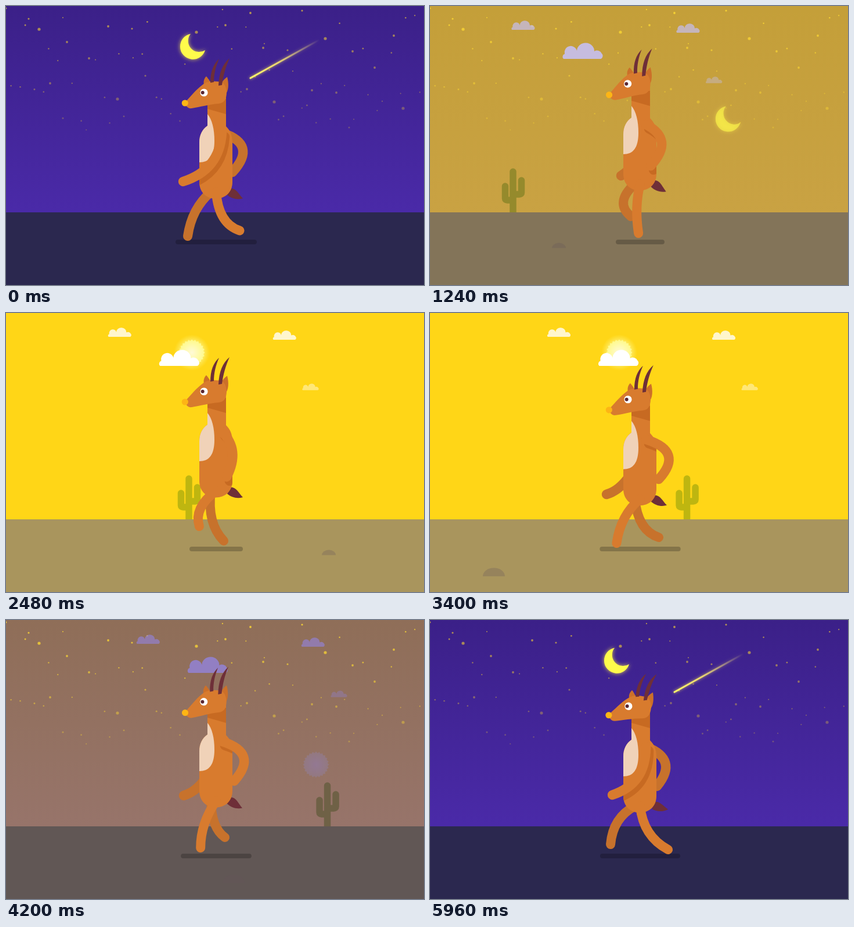
These frames come from a looping animation (720x480 px, 6040 ms). An HTML page with a canvas:

```html
<!DOCTYPE html>
<html lang="en">
<head>
<meta charset="utf-8">
<title>Night and day walk</title>
<style>
  html, body { margin: 0; width: 100%; height: 100%; overflow: hidden; background: #3b2088; }
  canvas { display: block; width: 720px; height: 480px; }
</style>
</head>
<body>
<canvas id="stage" width="720" height="480"></canvas>
<script>
const ctx = document.getElementById('stage').getContext('2d');
const LOOP = 6040, TICK = 40, STRIDE = LOOP / 8, STEP = STRIDE / 2;
const HORIZON = 355;
const SKIN = '#d87b2e', FAR_SKIN = '#c7722c', SHADE = '#c76a22', MAROON = '#6e2f38';

const clamp = v => Math.max(0, Math.min(1, v));
const lerp = (a, b, k) => a + (b - a) * k;
const mix = (a, b, k) => `rgb(${a.map((v, i) => Math.round(lerp(v, b[i], k)))})`;
const easeInOut = k => k < 0.5 ? 2 * k * k : 1 - 2 * (1 - k) ** 2;

// Smooth periodic interpolation through rows of [time, ...values].
function track(keys, period, time) {
  const t = ((time % period) + period) % period, n = keys.length;
  let i = n - 1;
  while (i > 0 && keys[i][0] > t) i--;
  const at = j => {
    const wrap = Math.floor(j / n), row = keys[j - wrap * n];
    return [row[0] + wrap * period, ...row.slice(1)];
  };
  const [a, b, c, d] = [at(i - 1), at(i), at(i + 1), at(i + 2)];
  const h = c[0] - b[0], u = (t - b[0]) / h, u2 = u * u, u3 = u2 * u;
  return b.slice(1).map((v, j) => {
    const k = j + 1;
    const m0 = (c[k] - a[k]) / (c[0] - a[0]) * h;
    const m1 = (d[k] - b[k]) / (d[0] - b[0]) * h;
    return (2 * u3 - 3 * u2 + 1) * v + (u3 - 2 * u2 + u) * m0 +
           (3 * u2 - 2 * u3) * c[k] + (u3 - u2) * m1;
  });
}

// Per step: body lift, head lift, head tilt in degrees, shadow half width.
const BOUNCE = [
  [0, 0, 0, 0, 70], [47, -9, -8.5, -1.5, 61], [107, -14, -15.5, -2, 42],
  [215, -14, -14, 0, 46], [297, 0, 0, 4.5, 69], [340, 0, 0, 3, 70]
];
// Per stride: foot, then bend of the leg.
const LEG = [
  [0, 313, 396, 320, 348], [47, 327, 392, 327, 350], [107, 351, 391, 344, 345],
  [215, 375, 392, 346, 362], [297, 402, 395, 359, 372], [380, 394, 386, 358, 374],
  [425, 377, 374, 354, 358], [485, 346, 362, 317, 338], [592, 325, 367, 315, 335],
  [675, 311, 386, 315, 340]
];
// Per stride: hand, then elbow.
const NEAR_ARM = [
  [0, 305, 302, 368, 282], [107, 337, 288, 370, 268], [215, 380, 282, 404, 236],
  [380, 394, 286, 438, 238], [425, 393, 277, 436, 229], [485, 380, 275, 422, 230],
  [592, 355, 288, 380, 262], [675, 314, 301, 372, 282]
];
const FAR_ARM = [
  [0, 390, 286, 434, 238], [107, 378, 274, 414, 230], [215, 356, 284, 376, 258],
  [380, 304, 312, 346, 300], [425, 306, 302, 348, 290], [485, 329, 292, 358, 276],
  [592, 378, 282, 404, 236], [675, 391, 286, 429, 240]
];

const shape = d => new Path2D(d);
const BODY = shape('M347 150V206C338 212 333 222 333 235V303C333 320 345 331.5 361 331.5C378 331.5 390 320 390 303V235C390 222 386 214 379 207V150Z');
const BELLY = shape('M347 186C355 195 359 212 359 232C359 258 350 269 333 269V235C333 222 338 212 347 206Z');
const NECK = shape('M347 160H379V186L347 177Z');
const TAIL = shape('M385 314C396 312 400 323 408 331C398 334 388 331 381 325Z');
const EARS = shape('M342 138C339 131 341 125 345 121C348 124 350 128 353 132ZM369 138C372 129 377 125 381 122C384 133 384 147 377 153Z');
const HORNS = shape('M352 132C352 113 357 100 367 91C361 104 358 118 358 131ZM366 137C367 115 373 100 385 90C378 105 374 121 372 136Z');
const HEAD = shape('M308 166C318 156 327 144 338 136C346 129 356 129 366 130C375 130 379 137 380 148C380 160 376 167 366 168C350 169 334 174 320 176C314 177 310 173 308 166Z');
const MOON = shape('M-4 -22A22 22 0 1 0 21 6A19 19 0 0 1 -4 -22Z');
const CLOUD = shape('M4 26A5 5 0 0 1 6 17.5A10 10 0 0 1 27 12A15 14 0 0 1 57 13A9 9 0 0 1 70 17A5.5 5.5 0 0 1 68 26Z');
const CACTUS = shape('M0 285V360M-13.5 310V331Q-13.5 334 -10 334H0M14.5 300V321Q14.5 324 11 324H0');

const SUN = new Path2D();
for (let i = 0; i < 48; i++) {
  const r = i % 2 ? 20 : 22.5, a = i * Math.PI / 24;
  SUN.lineTo(r * Math.cos(a), r * Math.sin(a));
}

// Bright stars have set places, faint ones are scattered.
const BRIGHT = [
  [57, 40], [328, 45], [550, 56], [192, 160], [462, 165], [684, 176],
  [105, 62], [143, 90], [176, 35], [421, 12], [443, 72], [76, 133], [668, 51],
  [635, 106], [569, 149], [415, 143], [527, 145], [378, 33], [597, 78],
  [217, 39], [39, 22], [510, 8], [240, 120], [485, 76], [591, 209], [98, 193]
];
const STARS = BRIGHT.map(([x, y], i) => [x, y, i < 6 ? 2.6 : i < 19 ? 1.9 : 1.6]);
let seed = 7;
const random = () => (seed = seed * 16807 % 2147483647) / 2147483647;
for (let i = 0; i < 56; i++) {
  STARS.push([(i * 0.618 % 1) * 720, 4 + 210 * random(), 1 + 0.5 * random()]);
}

function fill(path, color) {
  ctx.fillStyle = color;
  ctx.fill(path);
}

function at(x, y, draw) {
  ctx.save();
  ctx.translate(x, y);
  draw();
  ctx.restore();
}

function disc(x, y, r, color) {
  ctx.fillStyle = color;
  ctx.beginPath();
  ctx.arc(x, y, r, 0, Math.PI * 2);
  ctx.fill();
}

function limb(x, y, [endX, endY, bendX, bendY], width, color) {
  ctx.strokeStyle = color;
  ctx.lineWidth = width;
  ctx.lineCap = 'round';
  ctx.beginPath();
  ctx.moveTo(x, y);
  ctx.quadraticCurveTo(bendX, bendY, endX, endY);
  ctx.stroke();
}

function radial(r, ...stops) {
  const g = ctx.createRadialGradient(0, 0, 0, 0, 0, r);
  stops.forEach(([k, color]) => g.addColorStop(k, color));
  return g;
}

function drawSky(day) {
  const g = ctx.createLinearGradient(0, 0, 0, HORIZON);
  g.addColorStop(0, mix([59, 32, 136], [255, 214, 23], day));
  g.addColorStop(1, mix([74, 42, 168], [255, 214, 23], day));
  ctx.fillStyle = g;
  ctx.fillRect(0, 0, 720, HORIZON);
}

function drawStars(day) {
  const level = Math.min(0.64 + 0.5 * day, (1 - day) * 2.8);
  if (level <= 0) return;
  for (const [x, y, r] of STARS) {
    ctx.globalAlpha = clamp(level * (1 - y / 330));
    disc(x, y, r, '#ffdb32');
  }
  ctx.globalAlpha = 1;
}

function orbit(cx, cy, degrees, draw) {
  const a = degrees * Math.PI / 180;
  at(cx + 210 * Math.sin(a), cy - 210 * Math.cos(a), draw);
}

function drawMoon(t, day) {
  const angle = t < 3000
    ? 66 * (Math.max(0, t - 600) / 640) ** 2
    : -125 * (1 - clamp((t - 4200) / 1131)) ** 3;
  if (angle > 150) return;
  orbit(322, 280, angle, () => {
    ctx.globalAlpha = clamp((1 - day) * 2);
    ctx.shadowColor = 'rgba(255,240,70,.8)';
    ctx.shadowBlur = 7;
    fill(MOON, '#fffb4b');
  });
}

function drawSun(t, day) {
  const angle = t < 3400
    ? -125 * (1 - clamp((t - 1240) / 1619)) ** 3
    : 82 * ((t - 3400) / 800) ** 2;
  if (day <= 0 || angle > 150) return;
  orbit(326, 278, angle, () => {
    if (day > 0.6) {
      ctx.globalAlpha = (day - 0.6) / 0.4;
      disc(0, 0, 31, radial(31, [0.5, 'rgba(255,255,190,.75)'], [1, 'rgba(255,245,120,0)']));
    }
    ctx.globalAlpha = clamp(day * 1.4);
    const tone = k => mix([64, 32, 150], [255, 250, k], day);
    fill(SUN, radial(23, [0, tone(215)], [1, tone(135)]));
  });
}

function drawMeteor(t) {
  const out = t < 3000;
  const alpha = out ? 1 - t / 300 : 1;
  if (alpha <= 0 || (!out && t < 5400)) return;
  const x = out ? 421 : 421 + 565 * (1 - clamp((t - 5400) / 560)) ** 2;
  at(x, 124 - (x - 421) * 0.5546, () => {
    const g = ctx.createLinearGradient(0, 0, 119, -66);
    g.addColorStop(0, '#fff96a');
    g.addColorStop(0.4, 'rgba(255,235,110,.85)');
    g.addColorStop(1, 'rgba(255,230,150,0)');
    ctx.globalAlpha = alpha;
    ctx.shadowColor = 'rgba(255,240,80,.8)';
    ctx.shadowBlur = 5;
    limb(0, 0, [119, -66, 60, -33], 3, g);
  });
}

function drawClouds(t, day) {
  if (day <= 0) return;
  const drift = 0.0285 * (t - 1240);
  const color = mix([64, 32, 150], [255, 255, 255], day);
  const cloud = (x, y, size, alpha) => at(x + drift, y, () => {
    ctx.scale(size, size);
    ctx.globalAlpha = Math.min(1, day * 4) * alpha;
    fill(CLOUD, color);
  });
  cloud(139, 26, 0.58, 0.78);
  cloud(226, 65, 1, 1);
  cloud(423, 31, 0.58, 0.78);
  cloud(474, 122, 0.41, 0.42);
}

function drawMound(x, base, w, h) {
  ctx.fillStyle = 'rgba(100,85,90,.28)';
  ctx.beginPath();
  ctx.ellipse(x, base, w, h, 0, Math.PI, Math.PI * 2);
  ctx.fill();
}

function drawLand(t, day) {
  at(143 + 0.1387 * (t - 1240), 0, () => {
    ctx.strokeStyle = mix([52, 34, 110], [190, 182, 16], day);
    ctx.lineWidth = 11.5;
    ctx.lineCap = 'round';
    ctx.lineJoin = 'round';
    ctx.stroke(CACTUS);
  });
  ctx.fillStyle = mix([43, 40, 79], [169, 149, 93], day);
  ctx.fillRect(0, HORIZON, 720, 480 - HORIZON);
  drawMound(222 + 0.2694 * (t - 1240), 416.5, 12, 9);
  drawMound(110 + 0.3526 * (t - 3400), 453, 19, 14.5);
}

function drawHead(lift, tilt) {
  at(350, 160 + lift, () => {
    ctx.rotate(tilt);
    ctx.translate(-350, -160);
    fill(EARS, '#cc7029');
    fill(HEAD, SKIN);
    fill(HORNS, MAROON);
    disc(341, 149, 6.6, '#fff');
    disc(338.7, 149, 3, '#5a2630');
    disc(308.3, 167, 5.6, '#fdb515');
  });
}

function drawAntelope(t) {
  const [lift, headLift, tilt, half] = track(BOUNCE, STEP, t);
  const turn = tilt * Math.PI / 180;
  const hipY = 320 + lift, armY = 218 + lift;
  const nearArm = track(NEAR_ARM, STRIDE, t);
  const nearLeg = track(LEG, STRIDE, t + STEP);
  nearLeg[0] += 8;
  nearLeg[2] += 8;

  limb(366 - half, 406, [358 + half, 406, 362, 406], 8, 'rgba(0,0,0,.22)');
  limb(372, armY, track(FAR_ARM, STRIDE, t), 16.5, FAR_SKIN);
  limb(353, hipY, track(LEG, STRIDE, t), 16, FAR_SKIN);
  at(383, 318 + lift, () => {
    ctx.rotate(-2.6 * turn);
    ctx.translate(-383, -318);
    fill(TAIL, MAROON);
  });

  at(0, lift, () => {
    fill(BODY, SKIN);
    fill(BELLY, '#f0d2b8');
    fill(NECK, SHADE);
    ctx.clip(BODY);
    ctx.translate(5, 7 - lift);
    limb(372, armY, nearArm, 16.5, SHADE);
  });
  limb(362, hipY, nearLeg, 16, SKIN);
  limb(372, armY, nearArm, 16.5, SKIN);
  drawHead(headLift, turn);
}

function draw(t) {
  const dawn = easeInOut(clamp((t - 750) / 800));
  const dusk = easeInOut(clamp((t - 3770) / 800));
  const day = dawn - dusk;
  ctx.clearRect(0, 0, 720, 480);
  drawSky(day);
  drawStars(day);
  drawMeteor(t);
  drawMoon(t, day);
  drawSun(t, day);
  drawClouds(t, day);
  drawLand(t, day);
  drawAntelope(t);
}

const start = performance.now();
function tick() {
  const t = (performance.now() - start) % LOOP;
  draw(Math.min(Math.floor(t / TICK) * TICK, LOOP - 2 * TICK));
  requestAnimationFrame(tick);
}
tick();
</script>
</body>
</html>
```
